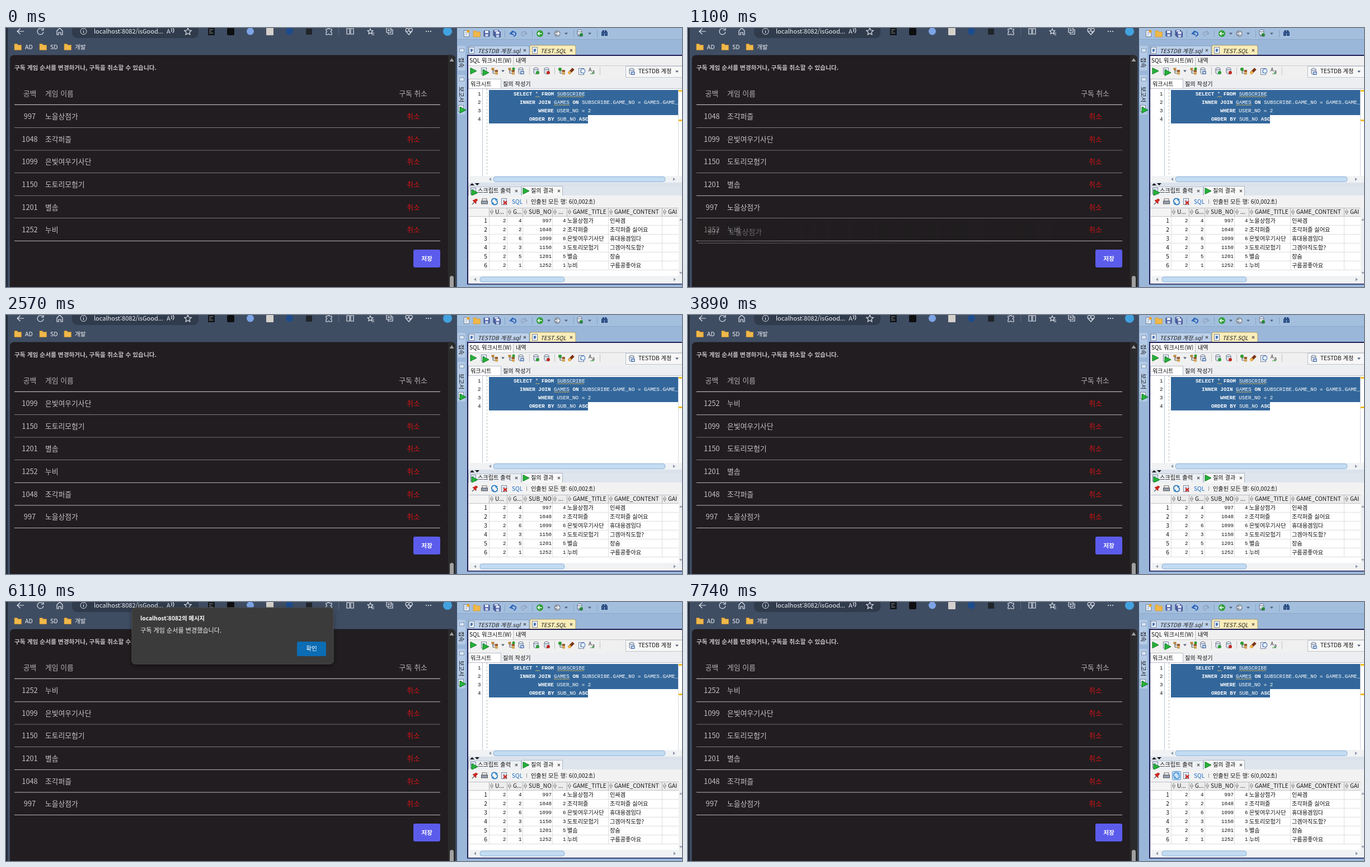
Recreate the animation shown at these times as an HTML page. Size 1208 by 464 pixels, loop 8000 ms.

```html
<!DOCTYPE html>
<html lang="ko">
<head>
<meta charset="utf-8">
<title>Drag to reorder</title>
<style>
html, body { margin: 0; width: 100%; height: 100%; overflow: hidden; background: #3f4d63; }
svg { display: block; width: 1208px; height: 464px; }
text { font-family: "Noto Sans CJK KR", "Noto Sans CJK", "Noto Sans", sans-serif; white-space: pre; }
.mono { font-family: "Liberation Mono", "Noto Sans CJK KR", monospace; }
</style>
</head>
<body>
<svg id="stage" viewBox="0 0 1208 464" xmlns="http://www.w3.org/2000/svg"></svg>
<script>
const LOOP = 8000, TOP = 138.3, PITCH = 40.55;

// Drawing helpers: each returns SVG markup.
const rect = (x, y, w, h, fill, more = '') =>
  `<rect x="${x}" y="${y}" width="${w}" height="${h}" fill="${fill}" ${more}/>`;
const circle = (x, y, r, fill, more = '') =>
  `<circle cx="${x}" cy="${y}" r="${r}" fill="${fill}" ${more}/>`;
const path = (d, stroke = 'none', width = 1, fill = 'none') =>
  `<path d="${d}" stroke="${stroke}" stroke-width="${width}" fill="${fill}"/>`;
const text = (x, mid, str, size, fill, more = '') =>
  `<text x="${x}" y="${mid + size * 0.36}" font-size="${size}" fill="${fill}" ${more}>${str}</text>`;
const group = (id, body, more = '') => `<g id="${id}" ${more}>${body}</g>`;
const at = (x, y, body) => `<g transform="translate(${x} ${y})">${body}</g>`;
const MID = 'text-anchor="middle"', END = 'text-anchor="end"', BOLD = 'font-weight="700"';

// Small toolbar icons, centred on a point.
const doc = (x, y) => at(x, y, rect(-4.5, -5.5, 9, 11, '#fff', 'stroke="#6e7f9c"') +
  path('M-2.5 -2.5H2.5M-2.5 0H2.5M-2.5 2.5H1', '#6f93c0'));
const disk = (x, y) => at(x, y, rect(-5, -5, 10, 10, '#5b6fb0', 'rx="1" stroke="#36457c"') +
  rect(-3, -5, 6, 4, '#e8eefc') + rect(-2.5, 1, 5, 4, '#cdd6ee'));
const play = (x, y) => path(`M${x - 5} ${y - 5.5}L${x + 6} ${y}L${x - 5} ${y + 5.5}Z`, '#0c7a1c', 1, '#25b23a');
const drop = (x, y) => path(`M${x - 3} ${y - 1.5}h6l-3 3.5z`, 'none', 0, '#4d6079');
const close = (x, y) => path(`M${x - 2} ${y - 2}l4 4m0 -4l-4 4`, '#555', 1.1);
const base = (x, y, color, mark) => at(x, y,
  path('M-4 -4V3C-4 6 4 6 4 3V-4', '#62718a', 1, '#dfe5ee') +
  `<ellipse cx="0" cy="-4" rx="4" ry="1.8" fill="#f6f8fb" stroke="#62718a"/>` +
  (mark ? circle(3, 3, 3, color) : path('M0 1h5v4h-5z', color, 1.4, '#fff')));
const nodes = (x, y) => at(x, y, path('M-3 -3V4H3M-3 0H3', '#555') +
  rect(-5.5, -5.5, 5, 4, '#b98236') + rect(1, -2, 5, 4, '#9b5d2c') + rect(1, 2.5, 5, 4, '#d1a04d'));
const folder = (x, y, c = '#f0b84a') => path(`M${x} ${y}h5l1.5 2h6v9h-12.5z`, '#c98e25', .6, c);
const swirl = (x, y, c) => at(x, y, path('M-4 2A4.5 4.5 0 0 1 3 -4M4 -2A4.5 4.5 0 0 1 -3 4', c, 2) +
  path('M1 -6L6 -4L2 -1ZM-1 6L-6 4L-2 1Z', 'none', 0, c));

const games = [[997, '노을상점가'], [1048, '조각퍼즐'], [1099, '은빛여우기사단'],
               [1150, '도토리모험기'], [1201, '별솜'], [1252, '누비']];

const rowBody = ([no, name]) => rect(15, 0, 761, PITCH, '#211d20') +
  text(42.5, 20.5, no, 12.8, '#c6c3c6', MID) + text(70, 20.5, name, 12.8, '#c6c3c6') +
  text(728, 20.5, '취소', 12.8, '#d01418', MID) + rect(15, PITCH - .6, 761, 1, '#b9b7b9');

function browser() {
  const ink = '#dfe4ec', line = d => path(d, ink, 1.2);
  let s = rect(0, 0, 806, 464, '#3f4d63') + rect(0, 0, 3, 464, '#222b38') +
    rect(118, -20, 226, 38, '#303b4c', 'rx="9"');
  s += line('M32 6H20M25.500 1L20 6L25.500 11') + line('M66 3A5.500 5.500 0 1 0 67 7M67 0V4H63') +
    line('M91 5L96 0L101 5V12H98V8H94V12H91Z') + circle(138.5, 6, 5.5, 'none', `stroke="${ink}"`) +
    line('M138.500 5V9M138.500 3V4') + text(157, 6, 'localhost:8082/isGood...', 11, '#f0f2f5') +
    text(287, 6, 'A', 11, ink) + line('M295 1q3 3 0 6M298 0q4 4 0 9');
  const star = (x, r) => {
    let d = '';
    for (let i = 0; i < 10; i++) {
      const a = i * Math.PI / 5 - Math.PI / 2, q = i % 2 ? r * .48 : r;
      d += (i ? 'L' : 'M') + (x + q * Math.cos(a)) + ' ' + (6.5 + q * Math.sin(a));
    }
    return line(d + 'Z');
  };
  s += star(325, 6.5) + star(651, 5) + line('M653 9h5M654 12h4');
  s += rect(361, 0, 12, 13, '#14171b') + path('M363 3h7M363 6h4M363 9h7', '#8b929c') +
    rect(395, 0, 13, 13, '#0e0f11', 'rx="2"') + circle(436.5, 6, 6.5, '#7da4e6') +
    rect(465, 0, 13, 13, '#d4d0cb', 'rx="1"') + circle(506.5, 6, 6.5, '#1d4c8c') +
    rect(536, 1, 11, 11, '#20252b', 'rx="1"');
  s += line('M572 2h3q1.500 -4 3 0h4v3q-4 1.500 0 3v4h-4q-1.500 -3 -3 0h-3v-4q3 -1.500 0 -3z') +
    rect(594, 0, 1, 13, '#5b687b') + line('M609 1h5v10h-5zM616 1h5v10h-5z') +
    line('M680 0h8v8h-8zM683 8v3h8v-8h-3M684 2v4M682 4h4') +
    line('M720 12L714.500 6Q713 1 717 .5Q719 .5 720 3Q721 .5 723 .5Q728 1 725.500 6ZM715 6h3l2 -2l2 4l1 -2h3');
  for (const x of [751, 755, 759]) s += circle(x, 6, 1.1, ink);
  s += circle(789, 6, 8, '#42a2df');
  [[15, 'AD'], [60, 'SD'], [104, '개발']].forEach(([x, label]) =>
    s += folder(x, 28.5) + text(x + 19, 34, label, 10.6, '#f2f4f6'));
  // Page
  s += path('M7 464V56Q7 48.500 15 48.500H796Q803 48.500 803 56V464Z', 'none', 0, '#211d20') +
    path('M790 464V48.500H796Q803 48.500 803 56V464Z', 'none', 0, '#2b2b2c') +
    path('M792.500 60L796.500 54L800.500 60Z', 'none', 0, '#a0a0a0') + rect(793, 444, 7, 30, '#a0a0a0', 'rx="3.5"') +
    text(15, 71, '구독 게임 순서를 변경하거나, 구독을 취소할 수 있습니다.', 10.7, '#c6c3c6', BOLD) +
    text(42.5, 117.5, '공백', 12.8, '#b4b1b4', MID) + text(70, 117.5, '게임 이름', 12.8, '#b4b1b4') +
    text(727.5, 117.5, '구독 취소', 12.8, '#b4b1b4', MID) + rect(15, 136.8, 761, 1.2, '#b9b7b9') +
    rect(728, 397, 48, 32, '#5c5cec', 'rx="3"') + text(752, 413, '저장', 10.7, '#fff', MID + BOLD);
  return s;
}

function ide() {
  const ui = (x, y, str, fill = '#111', more = '') => text(x, y, str, 10.2, fill, more);
  const bar = (x, y, w) => rect(x, y, w, 9, '#c3dcf3', 'rx="4" stroke="#8db1d6"');
  const arrow = (x, y, d) => path(`M${x - d * 2} ${y - 3}L${x + d * 2} ${y}L${x - d * 2} ${y + 3}Z`, 'none', 0, '#8a97a8');
  let s = rect(806, 0, 402, 464, '#9ab7d9') + rect(806, 0, 402, 21, '#a4bfde') + rect(806, 20, 402, 1, '#8aa8cc');
  // Main toolbar
  s += doc(823, 10) + circle(826, 6, 2.5, '#e8a020') + folder(835, 5) + disk(859, 10) + disk(876, 9) + disk(878.5, 11.5) +
    path('M902 10q5 -6 9 -1q1 4 -4 6M906 5L901 10L907 12', '#2a62b8', 2) +
    path('M930 10q-5 -6 -9 -1q-1 4 4 6M926 5L931 10L925 12', '#8fa3bd', 1.6) +
    circle(954, 10, 6, '#2e9e37') + path('M957.500 10H951M953.500 7L950.500 10L953.500 13', '#fff', 1.6) + drop(970, 10) +
    circle(985, 10, 6, '#8c98a6') + path('M981.500 10H988M985.500 7L988.500 10L985.500 13', '#fff', 1.6) + drop(1001, 10) +
    base(1025, 9, '#2e9e37', true) + text(1022, 13, 'SQL', 5, '#234') + drop(1043, 10) +
    path('M1065 13V8L1067 5H1068V13ZM1074 13V8L1072 5H1071V13ZM1068 8h3', '#27497e', 2, '#4a74b5');
  for (const x of [891, 940, 1014, 1056]) s += rect(x, 4, 1, 13, '#86a2c6');
  // Side strip
  s += rect(807, 32, 14, 44, '#b4cae6', 'rx="2"') + rect(807, 84, 14, 71, '#b4cae6', 'rx="2"');
  for (const y of [40, 92]) s += rect(810.5, y - 3, 8, 6, '#dde8f5', 'stroke="#7c95b5"');
  s += at(814, 62, `<g transform="rotate(90)">${ui(0, 0, '접속', '#111', MID)}</g>`) +
    at(814, 119, `<g transform="rotate(90)">${ui(0, 0, '보고서', '#111', MID)}</g>`) + doc(813, 144) + play(816, 147);
  // Editor tabs
  s += path('M826 49V34Q826 32 829 32H932Q935 32 935 35V49Z', '#7f9cc2', 1, '#bdd1ea') +
    path('M936 49V34Q936 31 939 31H1015Q1018 31 1018 34V49Z', '#a69a6d', 1, '#faedb9');
  for (const x of [832, 945]) s += doc(x, 40) + circle(x, 40, 2.2, '#4672b4');
  s += ui(843, 41, 'TESTDB 계정.sql', '#222', 'font-style="italic"') + close(927, 40) +
    ui(955, 41, 'TEST.SQL', '#222', 'font-style="italic"') + close(1010, 40);
  // Worksheet
  s += rect(825, 49, 390, 410, '#f0f0f0', 'stroke="#1e1c56" stroke-width="2"') +
    rect(827, 51, 79, 16, '#fafafa') + rect(906, 52, 1, 15, '#bbb') +
    ui(828, 58.5, 'SQL 워크시트(W)') + ui(911, 58.5, '내역') + rect(826, 67, 382, 1, '#c8ccd2');
  s += play(835, 77) + doc(854, 77) + play(857, 80) + nodes(873, 77) + drop(888, 77) + nodes(903, 77) +
    circle(907, 73, 2.5, '#2b9d35') + base(920, 77, '#4672b4', false) + base(947, 77, '#2b9d35', true) +
    base(966, 77, '#c02a20', true) + nodes(993, 77) + circle(990, 74, 3, '#2d9d3a') +
    path('M1006 81L1014 73', '#7a3418', 5) + path('M1005 82L1009 78', '#efb548', 4) +
    doc(1028, 78) + circle(1031, 77, 4, '#e7f0fa', 'stroke="#386caf"') +
    text(1041, 75, 'A', 9, '#222') + text(1047, 78, 'a', 9, '#222') + path('M1044 82h6l-2 -2', '#2b9d35', 1.2);
  for (const x of [935, 980, 1061]) s += rect(x, 70, 1, 14, '#c2c2c2');
  s += rect(1107.5, 68.5, 110, 20, '#f7f7f7', 'stroke="#bcc4ce"') + base(1118, 78, '#4672b4', false) +
    ui(1130, 77.5, 'TESTDB 계정') + drop(1199, 78);
  s += rect(826, 91, 382, 18, '#eceef1') + rect(826.5, 91.5, 58, 18, '#fff', 'stroke="#b8bec8"') +
    ui(830, 100, '워크시트') + ui(888, 100, '질의 작성기') + rect(826, 108, 382, 1, '#b8bec8');
  s += rect(827, 109, 381, 156, '#fff') + rect(851, 109, 1, 156, '#b9c4d2') +
    path('M859.500 109V265', '#b5b5b5', 1).replace('/>', ' stroke-dasharray="3 3"/>') + rect(1201, 109, 1, 156, '#d4d8de');
  s += path('M863 111H1201V156H1040V171H863Z', 'none', 0, '#33679b');
  const code = (x, y, str) => text(x, y, str.replace(/\b(SELECT|FROM|INNER|JOIN|ON|WHERE|ORDER|BY|ASC)\b/g,
    '<tspan font-weight="700">$1</tspan>'), 9.25, '#fff', 'class="mono"');
  s += '<svg x="863" y="109" width="338" height="64" viewBox="863 109 338 64">' +
    code(907, 118, 'SELECT * FROM SUBSCRIBE') +
    code(918, 133, 'INNER JOIN GAMES ON SUBSCRIBE.GAME_NO = GAMES.GAME_NO') +
    code(951, 148, 'WHERE USER_NO = 2') + code(935, 163, 'ORDER BY SUB_NO ASC') + '</svg>';
  const wave = (x, y, n) => path(`M${x} ${y}` + 'l2 -2l2 2'.repeat(n), '#d9b65a', .9);
  s += wave(985, 124, 12) + wave(946, 124, 2) + wave(979, 139, 7);
  for (let i = 0; i < 4; i++) s += text(848.5, 118 + i * 15, i + 1, 9.25, '#111', END + ' class="mono"');
  s += rect(1202, 111, 6, 3, '#f2bd1c') + rect(1202, 164, 6, 3, '#f2bd1c');
  s += rect(826, 265, 382, 12, '#f0f2f4') + bar(871, 266.5, 307) + arrow(865, 271, -1) + arrow(1194, 271, 1) +
    rect(826, 277, 382, 6, '#dbe2ec') + path('M829 282L833 278L837 282ZM838 278H846L842 282Z', 'none', 0, '#111');
  // Result tabs and tools
  s += rect(826, 283, 382, 17, '#dfe5ed') + rect(826.5, 284.5, 94, 16, '#edf0f4', 'stroke="#b8c2ce"') +
    rect(921.5, 283.5, 73, 17, '#f8f8f8', 'stroke="#a9b5c4"') + doc(835, 292) + play(837, 295) +
    ui(843, 291.5, '스크립트 출력') + close(912, 292) + play(929, 292) + ui(938, 291.5, '질의 결과') + close(988, 292) +
    rect(826, 300, 382, 22, '#f2f2f2');
  s += path('M833 316L837 312', '#555', 1.2) + path('M834 309L840 315L840 311L843 308L840 306L837 308Z', '#98120f', .7, '#d8261d') +
    rect(851, 306, 8, 4, '#fff', 'stroke="#666"') + rect(849.5, 310, 11, 5, '#98a2b4', 'stroke="#555"') +
    group('tool', '') + swirl(873, 311, '#2c7fc7') + doc(890, 311) + path('M889 310l6 6m0 -6l-6 6', '#cf2018', 2) +
    ui(904, 311, 'SQL', '#1668c4') + rect(930, 307, 1, 8, '#999') + ui(938, 311, '인출된 모든 행: 6(0,002초)');
  // Result grid
  s += rect(827, 322, 375, 122, '#fff') + rect(827, 322, 375, 15, '#ececec') + rect(827, 322, 36, 15, '#f4f4f4');
  const cols = [863, 895, 923, 976, 1002, 1076, 1172];
  ['U...', 'G...', 'SUB_NO', '...', 'GAME_TITLE', 'GAME_CONTENT', 'GAI'].forEach((label, i) => {
    const x = cols[i];
    s += rect(x, 322, 1, 15, '#b5b5b5') + rect(x, 337, 1, 96, '#dedede') +
      path(`M${x + 5} 325l2.500 4l-2.500 5l-2.500 -5zM${x + 2.5} 329.500h5`, '#777', .8) +
      ui(x + 11, 329.5, label);
  });
  const notes = ['인싸겜', '조각퍼즐 싫어요', '휴대용겜임다', '그겜아직도함?', '장숨', '구름콩좋아요'];
  const gameNo = [4, 2, 6, 3, 5, 1], cell = (x, y, v) => text(x, y, v, 9.2, '#111', END + ' class="mono"');
  games.forEach(([no, name], i) => {
    const y = 345 + i * 16;
    s += rect(827, y + 8, 375, 1, '#dedede') + ui(860, y, i + 1, '#111', END) + cell(893.5, y, 2) +
      cell(921.5, y, gameNo[i]) + cell(975, y, no) + cell(1000.5, y, gameNo[i]) +
      ui(1003, y, name) + ui(1079, y, notes[i]);
  });
  s += rect(827, 322, 375, 1, '#b8bec8') + rect(827, 337, 375, 1, '#c4c4c4') +
    rect(1202, 322, 6, 136, '#eef0f2') + path('M1203 345l3 -4l3 4zM1203 437l3 4l3 -4z', 'none', 0, '#9aa5b3') +
    rect(827, 444, 375, 14, '#f0f2f4') + bar(847, 446, 151) + arrow(838, 450.5, -1) + arrow(1195, 450.5, 1) +
    rect(824, 459, 384, 5, '#9ab7d9') + rect(824, 458, 384, 1.5, '#1e1c56');
  return s;
}

const dialog = () =>
  rect(225, 10, 360, 101, '#3b3a3a', 'rx="6" stroke="#4b4a4a" filter="url(#shade)"') +
  text(240, 29, 'localhost:8082의 메시지', 10.3, '#fff', BOLD) +
  text(240, 51, '구독 게임 순서를 변경했습니다.', 11.1, '#f0f0f0') +
  rect(520, 71, 52, 26, '#0c6cb4', 'rx="3"') + text(546, 83.5, '확인', 10.7, '#fff', MID);

// Pointer highlights: start, end, x, y, width, height
const hovers = [
  [80, 150, 1061, 2, 16, 16], [150, 270, 807, 84, 14, 71],
  [6560, 6620, 807, 84, 14, 71], [6620, 6680, 826, 32, 109, 17],
  [6840, 6870, 866, 69, 27, 17], [6870, 7010, 847, 69, 15, 17], [7040, 7070, 847, 69, 15, 17],
  [7290, 7330, 871, 267, 307, 9], [7360, 7630, 831, 287, 84, 12],
  [7740, 8000, 865.5, 303.5, 15, 15]
];

// Drags: start, arrival, release, row, horizontal and vertical travel
const drags = [
  [810, 1170, 1440, 0, 5, 224],
  [1970, 2330, 2570, 0, 4, 178],
  [3150, 3450, 3890, 3, 6, -137]
];

const stage = document.getElementById('stage');
stage.innerHTML = `<defs>
  <linearGradient id="fade" gradientUnits="userSpaceOnUse" x1="15" y1="0" x2="776" y2="0">
    <stop offset="0" stop-color="#fff" stop-opacity=".48"/><stop offset=".12" stop-color="#fff" stop-opacity=".46"/>
    <stop offset=".3" stop-color="#fff" stop-opacity=".27"/><stop offset=".6" stop-color="#fff" stop-opacity=".1"/>
    <stop offset="1" stop-color="#fff" stop-opacity=".02"/></linearGradient>
  <mask id="soft" maskUnits="userSpaceOnUse" x="0" y="0" width="800" height="42">${rect(0, 0, 800, 42, 'url(#fade)')}</mask>
  <filter id="shade" x="-10%" y="-20%" width="120%" height="150%">
    <feDropShadow dx="0" dy="4" stdDeviation="5" flood-color="#000" flood-opacity=".35"/></filter></defs>` +
  browser() + games.map((g, i) => group('row' + i, rowBody(g))).join('') +
  games.map((g, i) => group('ghost' + i, `<g mask="url(#soft)">${rowBody(g)}</g>`, 'visibility="hidden"')).join('') +
  ide() + group('hover', hovers.map(([, , x, y, w, h]) =>
    rect(x, y, w, h, '#8fc4f5', 'fill-opacity=".38" stroke="#4f97d6" rx="1" visibility="hidden"')).join('')) +
  group('dialog', dialog());

const el = id => document.getElementById(id);
const rows = games.map((_, i) => el('row' + i)), ghosts = games.map((_, i) => el('ghost' + i));
const marks = [...el('hover').children], box = el('dialog');
const clamp = v => Math.min(1, Math.max(0, v));
const show = (node, on) => node.setAttribute('visibility', on ? 'visible' : 'hidden');
const move = (node, x, y) => node.setAttribute('transform', `translate(${x} ${y})`);
const ease = u => { const v = u ** .88; return v * v * (3 - 2 * v); };

function draw(t) {
  const order = games.map((_, i) => i);
  ghosts.forEach(g => show(g, false));
  for (const [start, stop, release, from, dx, dy] of drags) {
    if (t < start) break;
    const u = clamp((t - start) / (stop - start)), y = dy * ease(u);
    const shift = Math.sign(dy) * Math.floor(Math.max(0, Math.abs(y) - 8) / PITCH);
    const [id] = order.splice(from, 1);
    order.splice(from + shift, 0, id);
    if (t < release) {
      show(ghosts[id], true);
      move(ghosts[id], dx * u - 1, TOP + from * PITCH + y);
    }
  }
  order.forEach((id, i) => move(rows[id], 0, TOP + i * PITCH));

  const enter = clamp((t - 5330) / 170), leave = clamp((t - 6340) / 140);
  const on = t >= 5330 && leave < 1;
  show(box, on);
  box.setAttribute('opacity', (.13 + .87 * enter) * (1 - leave));
  move(box, 0, -2.6 * (1 - enter));

  hovers.forEach(([a, b], i) => show(marks[i], t >= a && t < b));
}

const begin = performance.now();
function tick() {
  draw((performance.now() - begin) % LOOP);
  requestAnimationFrame(tick);
}
tick();
</script>
</body>
</html>
```
